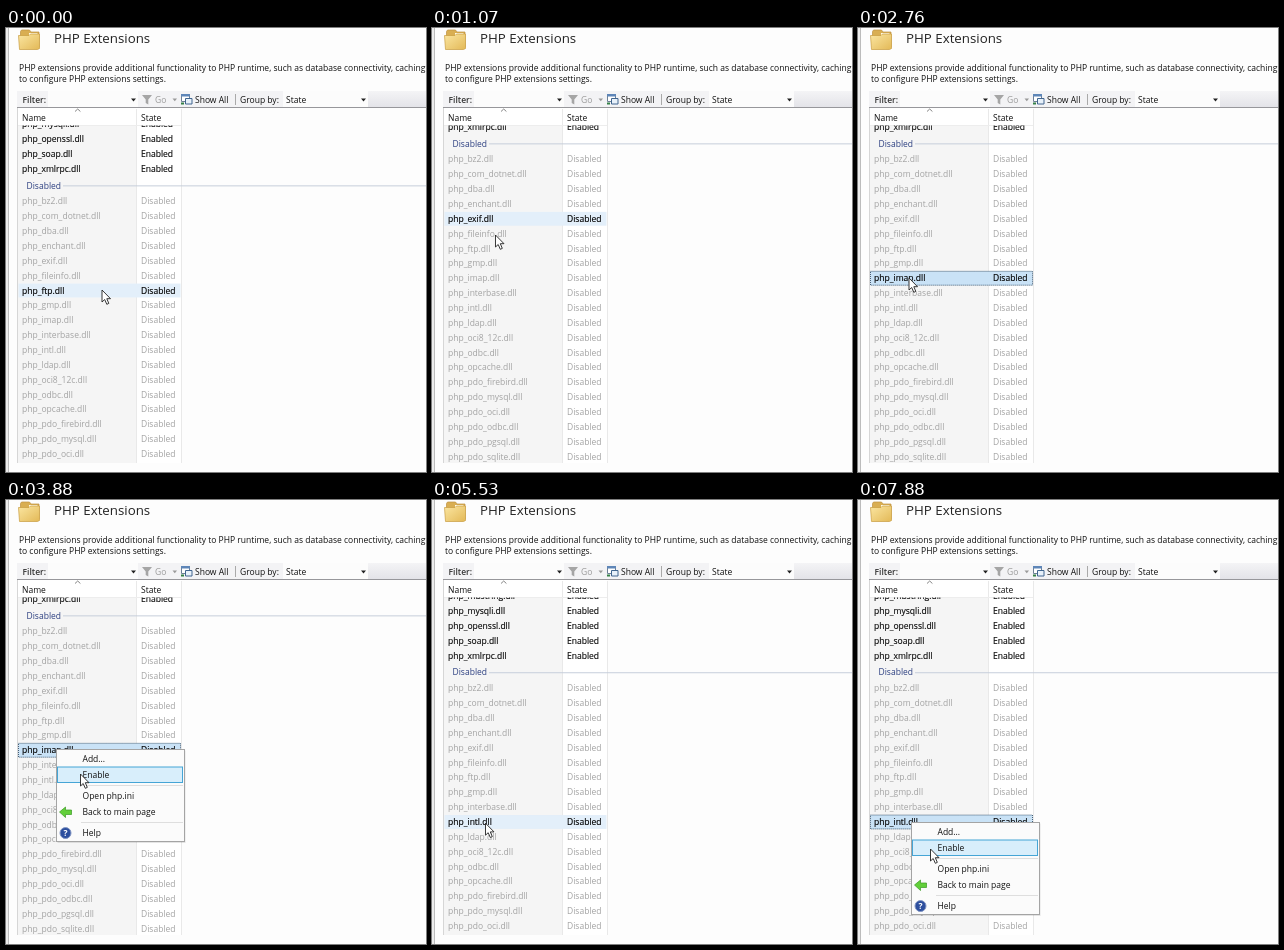
Recreate the animation shown at these times as an HTML page. Size 420 px wide and 444 px high, loop 8000 ms.

```html
<!DOCTYPE html>
<html lang="en">
<head>
<meta charset="utf-8">
<title>PHP Extensions</title>
<style>
  html, body { margin: 0; width: 100%; height: 100%; overflow: hidden; background: #fdfdfd; }
  svg { display: block; width: 420px; height: 444px; }
  text { font: 8.52px "Open Sans", "Noto Sans", sans-serif; fill: #111; white-space: pre; }
  .title { font-size: 13.3px; fill: #222; }
  .bold { font-weight: 600; fill: #333; }
  .group text { fill: #2c3f80; }
  .row text { stroke: #000; stroke-width: .15; }
  .off text { fill: #a3a3a3; stroke: none; }
  .row.on text { fill: #000; stroke: #000; }
  .mark { fill: none; }
  .hover .mark { fill: #e3effa; }
  .picked .mark { fill: #c9e2f6; }
  .focus .mark { stroke: #3b5872; stroke-dasharray: 1 1; }
  .faded { fill: #9b9b9b; }
  .pick { fill: none; }
  .hover .pick { fill: #d8eefb; stroke: #45a5d6; }
</style>
</head>
<body>
<svg viewBox="0 0 420 444">
  <defs>
    <clipPath id="view"><rect x="11" y="97.5" width="409" height="337.5"/></clipPath>
    <linearGradient id="bar" x2="0" y2="1"><stop stop-color="#f4f4f6"/><stop offset="1" stop-color="#e3e3e8"/></linearGradient>
    <linearGradient id="fold" x2="1" y2="1"><stop stop-color="#fbe6a2"/><stop offset="1" stop-color="#e3b957"/></linearGradient>
    <g id="menu">
      <rect x="1.5" y="1.5" width="128" height="92.5" fill="#000" opacity=".1"/>
      <rect x=".5" y=".5" width="128" height="92" fill="#fbfbfb" stroke="#a4a4a4"/>
      <path d="M25 36.5H127M25 73.5H127" stroke="#dedede"/>
    </g>
  </defs>

  <rect width="420" height="444" fill="#fdfdfd"/>
  <rect width="2" height="444" fill="#ececec"/>
  <path d="M2.5 0V444" stroke="#bcbcbc"/>

  <path d="M14.5 3.5l1-1.5h8l1.5 2h8v15h-18.500z" fill="#d9ae52" stroke="#bd9140" stroke-width=".7"/>
  <path d="M23 5h8.500v4H23z" fill="#fffbe9"/>
  <path d="M12.500 7.500H23l1.500-1.500H33.500V20.500L31.500 21.500H13.500z" fill="url(#fold)" stroke="#c99c3f" stroke-width=".7"/>
  <text class="title" x="48" y="14.6">PHP Extensions</text>
  <text x="13" y="43">PHP extensions provide additional functionality to PHP runtime, such as database connectivity, caching</text>
  <text x="13" y="54">to configure PHP extensions settings.</text>

  <rect x="11" y="63" width="409" height="16.5" fill="#f3f3f5"/>
  <rect x="362" y="63" width="58" height="16.5" fill="url(#bar)"/>
  <rect x="42" y="63" width="90" height="16" fill="#fcfcfc"/>
  <rect x="277" y="63" width="85" height="16" fill="#fcfcfc"/>
  <path d="M11 79.5H420" stroke="#97979b"/>
  <text class="bold" x="16.5" y="74.5">Filter:</text>
  <path d="M125 70.5h5l-2.5 3zM355 70.5h5l-2.5 3z" fill="#222"/>
  <path d="M136 67h10l-3.7 4.5v5l-2.6-1.5v-3.5z" fill="#a5a5a5"/>
  <text class="faded" x="149" y="74.5">Go</text>
  <path d="M166.5 70.5h4.500l-2.200 2.800z" fill="#999"/>
  <path d="M175.5 66.5h8v7h-8z" fill="#fff" stroke="#6c7f95"/>
  <path d="M175 66h9v2.500h-9z" fill="#5e86b8"/>
  <path d="M179.5 70.5h6.500v5.500h-6.500z" fill="#e8f1fa" stroke="#40658f"/>
  <path d="M175 75.5h3" stroke="#348047" stroke-width="2"/>
  <text x="189" y="74.5">Show All</text>
  <path d="M229.5 66V77" stroke="#a9a9a9"/>
  <text x="234" y="74.5">Group by:</text>
  <text x="280" y="74.5">State</text>

  <rect x="12" y="80" width="163" height="355" fill="#fff"/>
  <rect x="12" y="98" width="118" height="337" fill="#f5f5f5"/>
  <path d="M11.5 80V435" stroke="#d6d6d6"/>
  <path d="M130.5 81V435M175.5 81V435" stroke="#e9e9e9"/>
  <path d="M12 97.5H175" stroke="#ededed"/>
  <path d="M69 83.5l2.700-2.500 2.700 2.500" fill="none" stroke="#777" stroke-width=".9"/>
  <text x="16" y="93">Name</text>
  <text x="135" y="93">State</text>

  <g clip-path="url(#view)"><g id="list"></g></g>
  <g id="popup"></g>
  <path id="arrow" d="M.5 .5v12l2.700-2.500 2.100 4.800 2-.9-2-4.700h3.700z" fill="#fff" stroke="#222" stroke-width=".9"/>
</svg>
<script>
const NS = 'http://www.w3.org/2000/svg', LOOP = 8000, PITCH = 14.87;
const $ = id => document.getElementById(id);

function add(parent, tag, attrs, content) {
  const el = document.createElementNS(NS, tag);
  for (const k in attrs) el.setAttribute(k, attrs[k]);
  if (content) el.textContent = content;
  return parent.appendChild(el);
}

const enabled = 'curl gd2 gettext mbstring mysqli openssl soap xmlrpc'.split(' ');
const disabled = ('bz2 com_dotnet dba enchant exif fileinfo ftp gmp imap interbase intl ldap oci8_12c ' +
  'odbc opcache pdo_firebird pdo_mysql pdo_oci pdo_odbc pdo_pgsql pdo_sqlite').split(' ');

// y values are row centres, measured from the first group heading
function makeList(on, off) {
  const g = add($('list'), 'g'), rows = [];
  let y = 0;
  function row(name, cls, width, h) {
    const el = add(g, 'g', { class: cls });
    add(el, 'rect', { class: 'mark', x: 12.5, y: y - h / 2 + .5, width, height: h - 1 });
    rows.push({ name, el, cls, y, h });
    return el;
  }
  function group(title, names, cls) {
    const head = row(title, 'group', 408, 16);
    add(head, 'text', { x: 20.5, y: y + 3 }, title);
    add(head, 'path', { d: `M57 ${y + .3}H420`, stroke: '#c6cedb' });
    y += 15.7;
    for (const n of names) {
      const el = row(n, 'row ' + cls, 162, PITCH);
      add(el, 'text', { x: 16, y: y + 3 }, `php_${n}.dll`);
      add(el, 'text', { x: 135, y: y + 3 }, title);
      y += PITCH;
    }
    y += 16.5 - PITCH;
  }
  group('Enabled', on, '');
  group('Disabled', off, 'off');
  return { g, rows };
}

const before = makeList(enabled, disabled);
const after = makeList([...enabled, 'imap'].sort(), disabled.filter(n => n !== 'imap'));

const items = [['Add...', 9.5], ['Enable', 26], ['Open php.ini', 46.7], ['Back to main page', 63], ['Help', 84]];
const popup = $('popup');
add(popup, 'use', { href: '#menu' });
const entries = items.map(([label, y]) => {
  const el = add(popup, 'g');
  add(el, 'rect', { class: 'pick', x: 1.5, y: y - 8, width: 125, height: 15.5 });
  add(el, 'text', { x: 26.5, y: y + 3 }, label);
  return { el, y };
});
add(popup, 'path', { d: 'M3.5 63l6-5v3h6v4.5h-6v3z', fill: '#62cf3a', stroke: '#3a9a25', 'stroke-width': .7 });
add(popup, 'circle', { cx: 9.5, cy: 84, r: 5.5, fill: '#2d4f9e', stroke: '#8296c4' });
add(popup, 'text', { x: 7.6, y: 87, style: 'fill:#fff;font-weight:700' }, '?');

// time, x, y of the pointer tip
const path = [
  [60, 95.5, 261.5], [400, 85, 249], [770, 71, 232], [920, 71, 232], [1070, 63, 206.5],
  [1720, 58, 232], [1780, 58, 232], [2430, 50.5, 249.5], [3150, 50.5, 249.5],
  [3420, 64, 264], [3610, 64, 264], [3880, 74, 273.5], [4130, 74, 273.5], [4360, 73, 268],
  [4570, 73, 268], [4750, 71, 257.5], [4969, 71, 257.5], [4970, 53, 322.7],
  [6580, 53, 322.7], [7280, 71, 345], [7670, 71, 345], [7880, 72, 348.5]
];

function pointer(t) {
  const i = path.findIndex(p => p[0] > t);
  if (i === 0) return path[0].slice(1);
  if (i < 0) return path[path.length - 1].slice(1);
  const [t0, x0, y0] = path[i - 1], [t1, x1, y1] = path[i];
  const u = (t - t0) / (t1 - t0), e = u * u * (3 - 2 * u);
  return [x0 + (x1 - x0) * e, y0 + (y1 - y0) * e];
}

const listTop = t => t < 920 ? 21.3 : t < 4190 ? -20.7 : t < 4970 ? 106 : 21.3;

function draw(t) {
  const [x, y] = pointer(t), list = t < 4190 ? before : after;
  const first = t >= 3090 && t < 4190, second = t >= 6130, open = first || second;
  $('arrow').setAttribute('transform', `translate(${x} ${y})`);
  before.g.style.display = list === before ? '' : 'none';
  after.g.style.display = list === after ? '' : 'none';
  list.g.setAttribute('transform', `translate(0 ${listTop(t)})`);

  // hover catches up only after the scroll has settled
  const ht = t >= 920 && t < 1090 ? 919 : t;
  const hy = pointer(ht)[1] - listTop(ht);
  const picked = t >= 5770 ? 'intl' : t >= 2760 ? 'imap' : '';
  const focus = t >= 5770 || t < 4190;
  for (const r of list.rows) {
    let cls = r.cls;
    if (r.name === picked) cls += ' on picked' + (focus ? ' focus' : '');
    else if (!open && Math.abs(hy - r.y) <= r.h / 2) cls += ' on hover';
    r.el.setAttribute('class', cls);
  }

  popup.style.display = open ? '' : 'none';
  if (!open) return;
  const [mx, my] = first ? [50, 249] : [53, 322];
  popup.setAttribute('transform', `translate(${mx} ${my})`);
  popup.style.opacity = Math.min(1, .3 + (t - (first ? 3090 : 6130)) / 200);
  for (const e of entries)
    e.el.setAttribute('class', y - my > 3 && Math.abs(y - my - e.y) < 8 ? 'hover' : '');
}

const start = performance.now();
function tick() {
  draw((performance.now() - start) % LOOP);
  requestAnimationFrame(tick);
}
tick();
</script>
</body>
</html>
```
